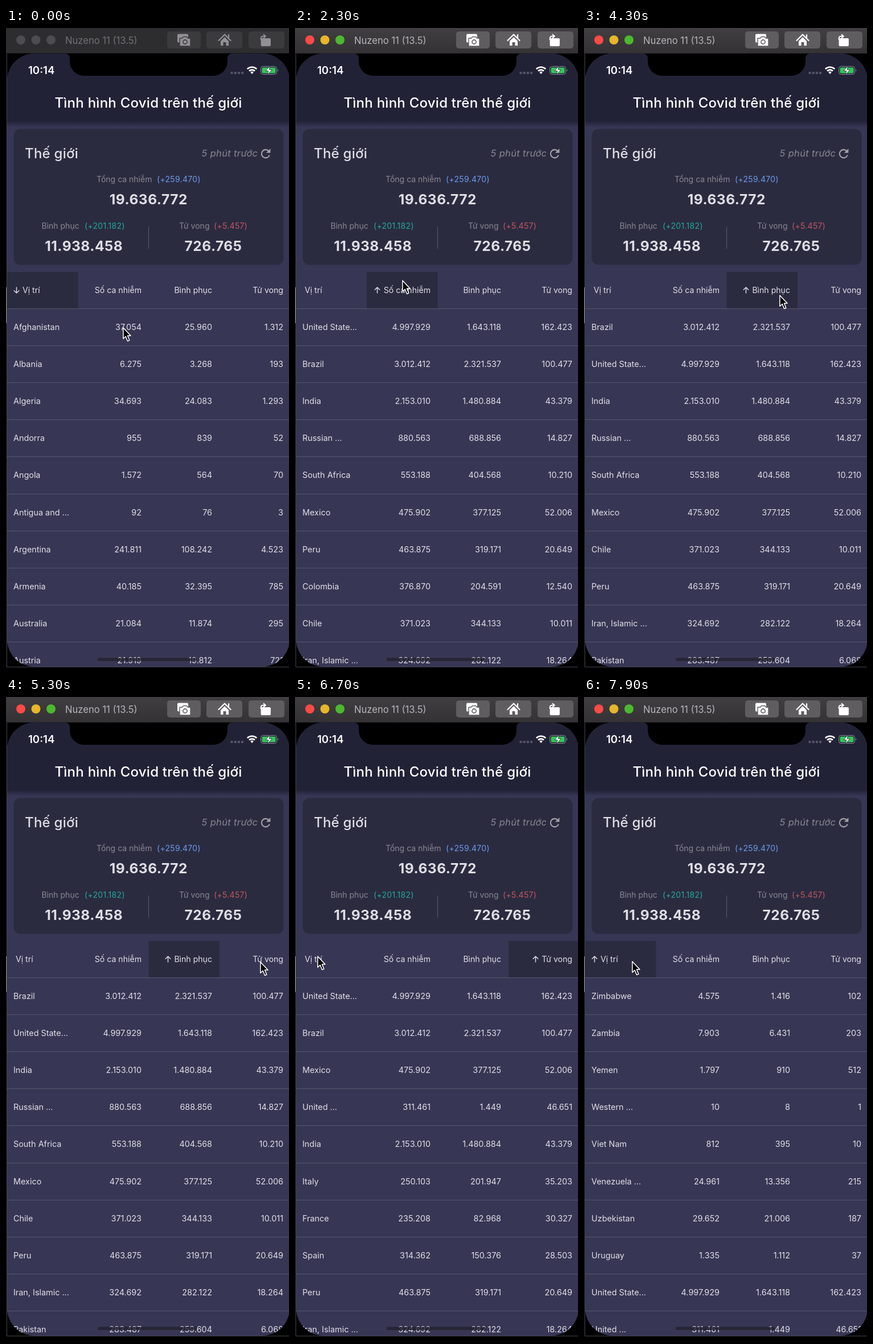
An HTML page that plays this animation: 497 by 1127 pixels, repeating every 8000 ms.

```html
<!DOCTYPE html>
<html lang="vi">
<head>
<meta charset="utf-8">
<title>Covid</title>
<style>
  html, body { margin: 0; width: 100%; height: 100%; overflow: hidden; background: #000; }
  svg { display: block; width: 100%; height: 100%; }
  text { font-family: Inter, "Open Sans", sans-serif; font-optical-sizing: none; white-space: pre; }
  .cell { font-size: 14.4px; fill: #e0e0e8; }
  .head { font-size: 14.1px; }
  .label { font-size: 14px; fill: #888892; }
  .delta { letter-spacing: .3px; }
  .title { font-size: 24px; font-weight: 500; letter-spacing: .25px; }
  .total { font-size: 24.5px; font-weight: 700; letter-spacing: .5px; fill: #dedee4; text-anchor: middle; }
  .ago { font-size: 16.5px; font-style: italic; letter-spacing: .35px; fill: #888892; }
  .end { text-anchor: end; }
  .line { fill: none; stroke-linecap: round; stroke-linejoin: round; }

  .state { visibility: hidden; animation: 8s step-end infinite; }
  .by-name-up { animation-name: name-up; }
  .by-cases { animation-name: cases; }
  .by-recovered { animation-name: recovered; }
  .by-deaths { animation-name: deaths; }
  .by-name-down { animation-name: name-down; }
  .focused { animation-name: focused; }
  @keyframes name-up { 0% { visibility: visible } 27.5%, 100% { visibility: hidden } }
  @keyframes cases { 0% { visibility: hidden } 27.5% { visibility: visible } 48.75%, 100% { visibility: hidden } }
  @keyframes recovered { 0% { visibility: hidden } 48.75% { visibility: visible } 67.5%, 100% { visibility: hidden } }
  @keyframes deaths { 0% { visibility: hidden } 67.5% { visibility: visible } 86.25%, 100% { visibility: hidden } }
  @keyframes name-down { 0% { visibility: hidden } 86.25%, 100% { visibility: visible } }
  @keyframes focused { 0% { visibility: hidden } 27.5%, 100% { visibility: visible } }

  #cursor { animation: point 8s ease-in-out infinite; }
  @keyframes point {
    0%, 4% { transform: translate(205px, 526px) }
    14%, 30% { transform: translate(188px, 443px) }
    36.5%, 40% { transform: translate(318px, 473px) }
    47%, 57% { transform: translate(343px, 469px) }
    65%, 71% { transform: translate(446px, 465px) }
    81.5%, 87% { transform: translate(39px, 455px) }
    96%, 100% { transform: translate(84px, 464px) }
  }
</style>
</head>
<body>
<svg viewBox="0 0 497 1127">
  <defs>
    <clipPath id="screen"><rect x="2" y="45" width="496" height="1078" rx="48"/></clipPath>
    <linearGradient id="shade" x2="0" y2="1">
      <stop stop-color="#17172a" stop-opacity=".55"/><stop offset="1" stop-color="#17172a" stop-opacity="0"/>
    </linearGradient>
    <linearGradient id="chrome" x2="0" y2="1">
      <stop stop-color="#403e41"/><stop offset="1" stop-color="#343235"/>
    </linearGradient>
  </defs>

  <g id="window"></g>
  <rect y="456" width="1" height="63" fill="#8e8e94"/>

  <g clip-path="url(#screen)">
    <rect y="45" width="497" height="1080" fill="#373654"/>
    <rect y="165" width="497" height="9" fill="url(#shade)"/>
    <rect y="45" width="497" height="120" fill="#222237"/>
    <path d="M104 45a8 8 0 0 1 8 8v6a25 25 0 0 0 25 25h227a25 25 0 0 0 25-25v-6a8 8 0 0 1 8-8z" fill="#000"/>

    <text x="39" y="81" font-size="18.6" font-weight="600" fill="#fff">10:14</text>
    <g fill="#55556a">
      <circle cx="396.5" cy="79" r="2.3"/><circle cx="402.7" cy="79" r="2.3"/>
      <circle cx="408.9" cy="79" r="2.3"/><circle cx="415.1" cy="79" r="2.3"/>
    </g>
    <g fill="none" stroke="#fff" stroke-width="2.6">
      <path d="M423.8 72.2a11.6 11.6 0 0 1 16.4 0M427 75.7a7.1 7.1 0 0 1 10 0"/>
      <path d="M432 81l-2.8-3.2a4 4 0 0 1 5.6 0z" fill="#fff" stroke="none"/>
    </g>
    <rect x="447.5" y="67.5" width="28" height="14" rx="4" fill="none" stroke="#8d8d9b"/>
    <rect x="449.5" y="69.5" width="24" height="10" rx="2.3" fill="#34c759"/>
    <path d="M477.3 72.3q2.2 2.2 0 4.5z" fill="#8d8d9b"/>
    <path d="M463.5 66.5l-7.5 9h4.8l-1.4 7 7.8-9.2h-5z" fill="#fff" stroke="#222237" stroke-width=".8"/>

    <text x="250" y="140" class="title" text-anchor="middle" fill="#fff">Tình hình Covid trên thế giới</text>

    <rect x="13.5" y="177.5" width="474" height="239" rx="12" fill="#2b2b40"/>
    <text x="33" y="229" class="title" fill="#dedee4">Thế giới</text>
    <text x="442.4" y="226" class="ago end">5 phút trước</text>
    <path d="M461.3 216.2a7.2 7.2 0 1 0 1.5 7.3" fill="none" stroke="#a2a2aa" stroke-width="2.1"/>
    <path d="M464.4 212v7.6h-7.6z" fill="#a2a2aa"/>
    <g class="label">
      <text x="159" y="271">Tổng ca nhiễm</text><text x="265" y="271" class="delta" fill="#6b9ceb">(+259.470)</text>
      <text x="62.5" y="353">Bình phục</text><text x="138" y="353" class="delta" fill="#22a99d">(+201.182)</text>
      <text x="304" y="353">Tử vong</text><text x="365" y="353" class="delta" fill="#c2585e">(+5.457)</text>
    </g>
    <text x="250.3" y="310" class="total">19.636.772</text>
    <text x="136.7" y="392" class="total">11.938.458</text>
    <text x="364" y="392" class="total">726.765</text>
    <path d="M250.5 349v39" stroke="#5a5a69"/>

    <g id="table"></g>
    <rect x="161" y="1107.5" width="174" height="5.5" rx="2.7" fill="#22212c" opacity=".8"/>
  </g>
  <path d="M1.5 45V1123.5H497" fill="none" stroke="#4b4b5a" stroke-width=".9"/>

  <path id="cursor" d="M.9 1V20.3L5.2 16.2 8.6 24.5 11.8 23.1 8.5 15H14Z" fill="#000" stroke="#fff" stroke-width="1.5" stroke-linejoin="round"/>
</svg>

<script>
const COUNTRIES = `
Afghanistan|37.054|25.960|1.312
Albania|6.275|3.268|193
Algeria|34.693|24.083|1.293
Andorra|955|839|52
Angola|1.572|564|70
Antigua and ...|92|76|3
Argentina|241.811|108.242|4.523
Armenia|40.185|32.395|785
Australia|21.084|11.874|295
Austria|21.919|19.812|721
Brazil|3.012.412|2.321.537|100.477
Chile|371.023|344.133|10.011
Colombia|376.870|204.591|12.540
France|235.208|82.968|30.327
India|2.153.010|1.480.884|43.379
Iran, Islamic ...|324.692|282.122|18.264
Italy|250.103|201.947|35.203
Mexico|475.902|377.125|52.006
Pakistan|283.487|259.604|6.068
Peru|463.875|319.171|20.649
Russian ...|880.563|688.856|14.827
South Africa|553.188|404.568|10.210
Spain|314.362|150.376|28.503
United ...|311.461|1.449|46.651
United State...|4.997.929|1.643.118|162.423
Uruguay|1.335|1.112|37
Uzbekistan|29.652|21.006|187
Venezuela ...|24.961|13.356|215
Viet Nam|812|395|10
Western ...|10|8|1
Yemen|1.797|910|512
Zambia|7.903|6.431|203
Zimbabwe|4.575|1.416|102`.trim().split('\n').map(line => line.split('|'));

const COLUMNS = [
  { title: 'Vị trí', left: 2, x: 13, arrow: 18.5 },
  { title: 'Số ca nhiễm', left: 126, x: 238, arrow: 144.5 },
  { title: 'Bình phục', left: 250.5, x: 362, arrow: 284.5 },
  { title: 'Tử vong', left: 375, x: 487, arrow: 422.5 }
];
const VIEWS = [
  ['by-name-up', 0, 1], ['by-cases', 1, -1], ['by-recovered', 2, -1],
  ['by-deaths', 3, -1], ['by-name-down', 0, -1]
];
const ROWS = 10, TOP = 493, PITCH = 65.1;

const cell = (value, column, x, y, cls = '') =>
  `<text class="cell ${cls}${column ? ' end' : ''}" x="${x}" y="${y}">${value}</text>`;

function sorted(column, direction) {
  const key = row => column ? +row[column].replaceAll('.', '') : row[0];
  return [...COUNTRIES].sort((a, b) => (key(a) < key(b) ? -1 : 1) * direction).slice(0, ROWS);
}

function view([name, column, direction]) {
  const { left, arrow } = COLUMNS[column];
  const titles = COLUMNS.map((c, i) =>
    cell(c.title, i, i ? c.x : column === 0 ? 29 : 17, 466, 'head')).join('');
  const rows = sorted(column, direction).map((row, r) =>
    row.map((value, i) => cell(value, i, COLUMNS[i].x, 531 + r * PITCH)).join('')).join('');
  return `<g class="state ${name}">
    <rect x="${left}" y="429" width="124.5" height="64" fill="#2b2b40"/>
    <path class="line" transform="translate(${arrow} 461) scale(1 ${-direction})"
      d="M0 5V-5M-4.3 -.8L0 -5L4.3 -.8" stroke="#e0e0e8" stroke-width="1.4"/>
    ${titles}${rows}</g>`;
}

const rules = Array.from({ length: ROWS }, (_, i) => `M2 ${Math.round(TOP + i * PITCH) + .5}H497`).join('');
document.getElementById('table').innerHTML =
  VIEWS.map(view).join('') + `<path d="${rules}" stroke="#57566f"/>`;

function titleBar(cls, back, lights, ink, button, icon) {
  const dots = lights.map((color, i) => `<circle cx="${26 + i * 26.5}" cy="21" r="8" fill="${color}"/>`).join('');
  const buttons = [[283, 59], [352, 63], [426, 63]].map(([x, w]) =>
    `<rect x="${x}" y="6" width="${w}" height="30" rx="5" fill="${button}"/>`).join('');
  return `<g class="${cls}">
    <rect width="497" height="44.5" fill="${back}"/>${dots}
    <text x="104" y="27.5" font-size="16.6" fill="${ink}">Nuzeno 11 (13.5)</text>${buttons}
    <rect x="301" y="10.5" width="19" height="15" rx="2" fill="${icon}"/>
    <path d="M305 18h4.5l2-2.5h6l2 2.5h4.5v14h-19z" fill="${icon}" stroke="${button}" stroke-width="1.4" stroke-linejoin="round"/>
    <circle cx="314.5" cy="24.5" r="3.6" fill="${icon}" stroke="${button}" stroke-width="1.6"/>
    <g class="line" stroke="${icon}" stroke-width="1.8">
      <path d="M373.5 22L384 11.5 394.5 22M391 12v5" stroke-width="2.2"/>
      <path d="M377 23l7-7 7 7v8h-4.5v-6h-5v6h-4.5z" fill="${icon}" stroke="none"/>
      <rect x="448.5" y="19" width="15.5" height="12" rx="1" fill="${icon}"/>
      <path d="M447.5 20v-1q0-4.5 4.5-4.5h3M452.5 11.5l3.5 3-3.5 3"/>
    </g></g>`;
}

document.getElementById('window').innerHTML =
  titleBar('', '#2d2c2f', Array(3).fill('#4e4c50'), '#737175', '#3b3a3d', '#929095') +
  titleBar('state focused', 'url(#chrome)', ['#fb4b46', '#e6b62b', '#4cb82f'], '#b7b5b9', '#5f5d60', '#fff');
</script>
</body>
</html>
```
